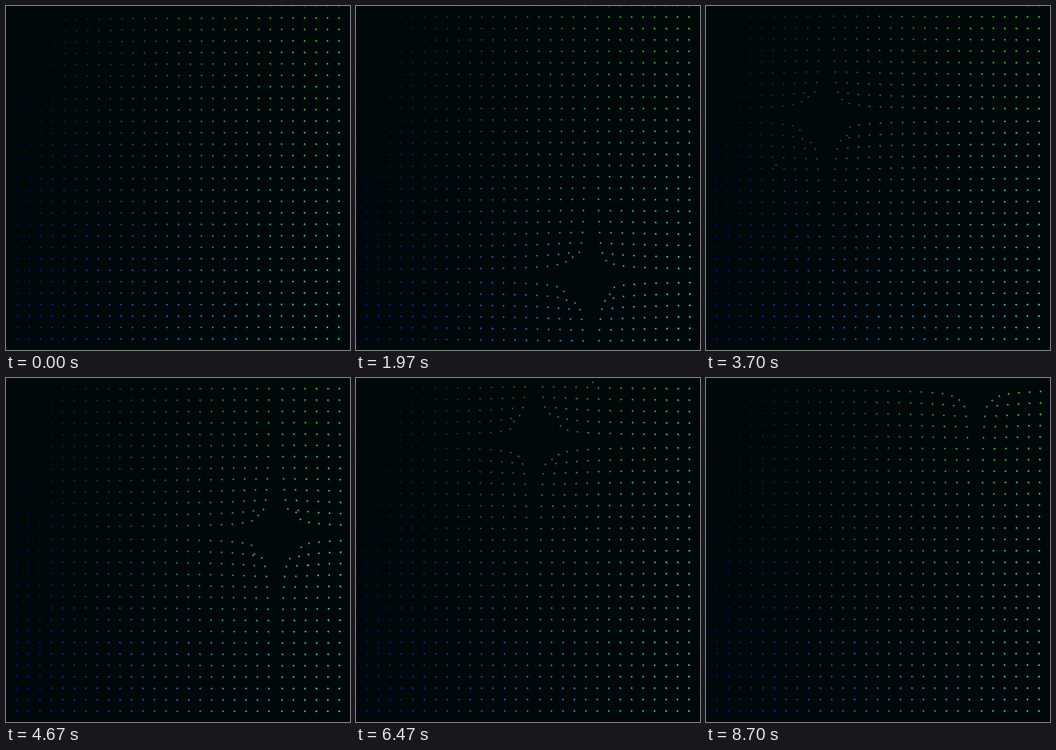
An HTML page with a canvas that plays this animation: 600x600 px, repeating every 8.73 s.

```html
<!DOCTYPE html>
<html lang="en">
<head>
<meta charset="utf-8">
<title>Repelled dots</title>
<style>
  html, body { margin: 0; width: 100%; height: 100%; overflow: hidden; background: #00080a; }
  canvas { display: block; }
</style>
</head>
<body>
<canvas id="stage" width="600" height="600"></canvas>
<script>
const ctx = document.getElementById('stage').getContext('2d');
const LOOP = 8730, START = 660, STEP = 100 / 3, LAST = 241;
const SIZE = 600, GAP = 20, RADIUS = 1.5, FORCE = 400;

// Key points of the pointer's two clockwise rounds
const keys = [
  { t: 0, x: 345, y: 12 },
  { t: 20, x: 416.8, y: 241.8 },
  { t: 30, x: 480, y: 390 },
  { t: 45, x: 330, y: 512 },
  { t: 59, x: 148, y: 479.8 },
  { t: 80, x: 110, y: 280 },
  { t: 107, x: 385, y: 130 },
  { t: 120, x: 473.8, y: 274.2 },
  { t: 134, x: 415, y: 434 },
  { t: 153, x: 312, y: 254 },
  { t: 172, x: 310, y: 110 },
  { t: 194, x: 418, y: 72 },
  { t: 216, x: 450, y: 12 },
  { t: LAST, x: 471, y: 1 }
];

function slope(i, axis) {
  const a = keys[Math.max(i - 1, 0)], b = keys[Math.min(i + 1, keys.length - 1)];
  return (b[axis] - a[axis]) / (b.t - a.t);
}

// Smooth Hermite curve through the key points
function pointer(t, axis) {
  const next = keys.findIndex(k => k.t > t);
  const j = next < 0 ? keys.length - 1 : next, i = j - 1;
  const a = keys[i], b = keys[j], span = b.t - a.t;
  const u = (t - a.t) / span, v = 1 - u;
  return v * v * (1 + 2 * u) * a[axis] + u * u * (3 - 2 * u) * b[axis] +
    span * u * v * (v * slope(i, axis) - u * slope(j, axis));
}

// Every dot moves diagonally away from the pointer, further when it is close
function draw(mx, my) {
  ctx.fillStyle = '#00080a';
  ctx.fillRect(0, 0, SIZE, SIZE);
  for (let x = 0; x < SIZE; x += GAP) {
    for (let y = 0; y < SIZE; y += GAP) {
      const push = FORCE / Math.max(Math.hypot(x - mx, y - my), 0.1);
      const px = x + (x > mx ? push : -push);
      const py = y + (y > my ? push : -push);
      ctx.fillStyle = `rgb(0, ${x / SIZE * 255}, ${y / SIZE * 255})`;
      ctx.beginPath();
      ctx.arc(px, py, RADIUS, 0, Math.PI * 2);
      ctx.fill();
    }
  }
}

function tick() {
  const time = performance.now() % LOOP;
  const step = Math.min(Math.floor((time - START) / STEP), LAST);
  if (step < 0) draw(0, 0);
  else draw(pointer(step, 'x'), pointer(step, 'y'));
  requestAnimationFrame(tick);
}
tick();
</script>
</body>
</html>
```
